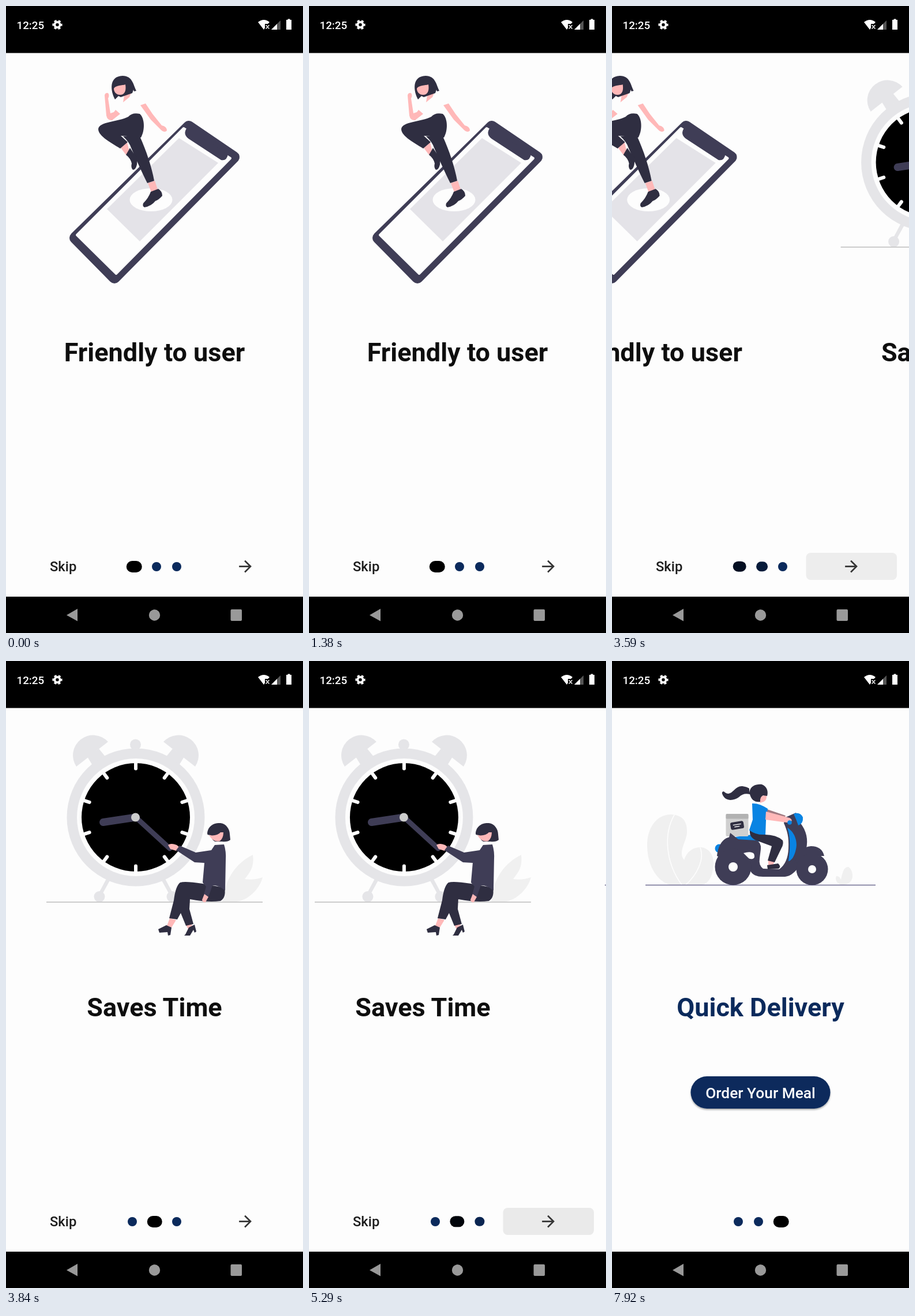
These frames come from a looping animation (515 px wide and 1087 px high, 8000 ms). An HTML page:

```html
<!DOCTYPE html>
<html lang="en">
<head>
<meta charset="utf-8">
<title>Onboarding</title>
<style>
html, body { margin: 0; width: 100%; height: 100%; overflow: hidden; background: #fdfdfd; }
body { position: relative; font-family: Roboto, sans-serif; }
svg { position: absolute; left: 0; top: 0; display: block; }
text { font-weight: 500; }
.title { font-size: 45px; font-weight: 700; text-anchor: middle; fill: #0e0e0e; }
.navy { fill: #0b2a5c; }
.ink { fill: #2f2e41; }
.slate { fill: #3f3d56; }
.skin { fill: #ffb8b8; }
.paper { fill: #fdfdfd; }
.pale { fill: #e5e5e8; }
.leaf { fill: #f0f0f0; }
.blue { fill: #0984e3; }
.line { fill: none; stroke-linecap: round; }

#strip, .dot, #controls, #press { animation: 8s infinite ease-in; }
#strip { animation-name: slide; }
@keyframes slide {
  0%, 42.5% { transform: translateX(0); }
  46.875%, 64.9% { transform: translateX(-515px); }
  69.275%, 100% { transform: translateX(-1030px); }
}

#controls { animation-name: hide; animation-timing-function: step-end; }
@keyframes hide {
  0% { visibility: visible; }
  67.775%, 100% { visibility: hidden; }
}

#press { animation-name: press; animation-timing-function: linear; opacity: 0; }
@keyframes press {
  0%, 41.25% { opacity: 0; }
  43.1%, 44.4% { opacity: 1; }
  47.4%, 63.6% { opacity: 0; }
  65.4%, 66.7% { opacity: 1; }
  69.8%, 100% { opacity: 0; }
}

.dot {
  position: absolute; top: 971.5px; width: 16px; height: 16px;
  border-radius: 10px; background: #0b2a5c; transform: translate(-50%, -50%);
}
#d0 { animation-name: first; }
#d1 { animation-name: second; }
#d2 { animation-name: third; }
@keyframes first {
  0%, 42.5% { left: 222px; width: 26.5px; height: 20px; background: #000; }
  46.875%, 100% { left: 219px; width: 16px; height: 16px; background: #0b2a5c; }
}
@keyframes second {
  0%, 42.5% { left: 261px; width: 16px; height: 16px; background: #0b2a5c; }
  46.875%, 64.9% { left: 257.5px; width: 26.5px; height: 20px; background: #000; }
  69.275%, 100% { left: 254px; width: 16px; height: 16px; background: #0b2a5c; }
}
@keyframes third {
  0%, 64.9% { left: 296px; width: 16px; height: 16px; background: #0b2a5c; }
  69.275%, 100% { left: 293px; width: 26.5px; height: 20px; background: #000; }
}
</style>
</head>
<body>
<svg width="515" height="1087" viewBox="0 0 515 1087">
  <defs>
    <filter id="shadow" x="-10%" y="-20%" width="120%" height="150%">
      <feDropShadow dx="0" dy="2" stdDeviation="1.5" flood-opacity=".35"/>
    </filter>
    <g id="bell">
      <path d="M122 183A35 35 0 0 1 177 140Z"/>
      <path d="M141 166L161 152L174 168L152 184Z"/>
      <path d="M176 374L182 377L166 406L160 404Z"/>
      <circle cx="162" cy="408.5" r="9.5"/>
    </g>
  </defs>

  <g id="strip">
    <!-- phone -->
    <g>
      <path class="slate" d="M317 209L395 262L188 471L120 402Z" stroke="#3f3d56" stroke-width="20" stroke-linejoin="round"/>
      <path class="paper" d="M123 397L308 212L389 264L191 464Z" stroke="#fdfdfd" stroke-width="4" stroke-linejoin="round"/>
      <path class="slate" d="M314 211L385 257Q383 269 373 267L318 231Q307 224 312 214Z"/>
      <path fill="#e4e3e8" d="M300 229L368 272L232 408L175 352Z"/>
      <ellipse class="paper" cx="251.5" cy="336" rx="37" ry="20"/>
      <g class="skin">
        <path d="M171 155Q172 150 177 151Q180 155 177 160L181 186L187 184L190 180L198 187L184 198Q176 199 174 190Z"/>
        <path d="M233 172L242 169L254 187L270 207Q279 209 279 216Q274 221 267 213L251 197Z"/>
        <path d="M203 167L205 155L217 151L214 158Z"/>
        <path d="M199 246L210 236L214 252L208 258Z"/>
        <path d="M246 307L258 303L263 318L252 323Z"/>
      </g>
      <g class="ink">
        <path d="M189 162C181 147 178 122 202 121C220 121 221 138 226 147L222 148L221 145L219 151L199 158L195 156Z"/>
        <path d="M212 192C195 201 160 200 160 214C161 226 182 237 198 247L211 236L199 225L234 228C241 216 241 195 232 187Q219 184 212 192Z"/>
        <path d="M203 226Q214 236 217 246C224 262 234 285 245 307L257 303C253 280 243 250 232 226Z"/>
        <path d="M208 258L215 246Q221 256 228 263L227 275Q225 284 220 284Q216 280 218 273Q216 264 208 258Z"/>
        <path d="M251 322L264 317Q271 321 271 329Q265 336 259 338Q252 347 240 349Q236 347 238 342Q247 333 251 322Z"/>
      </g>
      <path class="skin" d="M187 143C190 137 202 138 207 136C209 148 205 154 198 154C191 154 187 149 187 143Z"/>
      <text class="title" x="257.5" y="616">Friendly to user</text>
    </g>

    <!-- clock -->
    <g transform="translate(515)">
      <path class="leaf" d="M376 417C380 375 400 350 428 336C430 350 427 361 420 370L414 378C425 380 436 378 445 375C440 395 420 415 400 417Z"/>
      <g class="pale">
        <use href="#bell"/>
        <use href="#bell" transform="matrix(-1 0 0 1 450 0)"/>
        <circle cx="224.5" cy="145" r="9.5"/>
        <circle cx="225" cy="271" r="119.5"/>
      </g>
      <circle class="paper" cx="225" cy="271" r="102"/>
      <circle cx="225" cy="271" r="94"/>
      <g id="ticks" stroke="#fdfdfd" stroke-width="6" stroke-linecap="round"></g>
      <path class="line" d="M225 271L168.500 279.500" stroke="#3f3d56" stroke-width="13"/>
      <path class="line" d="M225 271L284 325" stroke="#3f3d56" stroke-width="9"/>
      <circle cx="224.500" cy="271" r="7.500" fill="#ccc"/>
      <path d="M70 418H445" stroke="#ccc" stroke-width="1.800"/>
      <g class="skin">
        <path d="M281 319Q286 315 296 319L301 323L295 329L285 326Z"/>
        <path d="M284 446L295 449L287 462L279 459Z"/>
        <path d="M312 458L322 456L324 464L316 465Z"/>
      </g>
      <g class="ink">
        <path d="M302 384Q310 381 341 386L379 393Q382 410 372 416Q350 419 319 413L318 430L325 456L312 459L303 437L297 448L283 446L291 415Q294 390 302 384Z"/>
        <path d="M264 465L278 458L287 462L285 475L281 476L280 470L266 471Z"/>
        <path d="M311 474L317 462L327 457L330 469L327 471L325 466L319 476L309 476Z"/>
        <path d="M349 299C350 285 362 280 372 281C382 282 388 292 388 300L389 310Q384 314 375 313H353Z"/>
      </g>
      <path class="paper" d="M348 301L355 302Q357 311 364 314H350Z"/>
      <path class="skin" d="M352 302Q366 304 372 297L377 297Q377 307 371 312Q360 315 352 302Z"/>
      <path class="slate" d="M362 319L378 318Q382 330 381 345L380 398Q368 388 358 389L351 409L343 405L347 391L341 384L344 350L327 349L295 328L301 320L329 332L356 328Z"/>
      <path class="skin" d="M344 404L351 409L346 418Q341 419 340 414Z"/>
      <text class="title" x="257.500" y="616">Saves Time</text>
    </g>

    <!-- scooter -->
    <g transform="translate(1030)">
      <path class="leaf" d="M100 388C75 380 60 350 61 315C63 285 80 266 102 266C122 267 131 277 130 298C128 315 118 325 122 340L125 345C130 330 140 323 154 323C168 324 176 336 176 350C176 375 165 388 155 388Z"/>
      <path class="line" d="M108 267C89 300 93 350 121 388M153 324C161 345 146 372 128 388" stroke="#fdfdfd" stroke-width="1.600"/>
      <path class="leaf" d="M397 388C390 386 386 378 389 373Q394 372 397 379C400 365 402 357 410 357C418 362 418 375 416 378C414 385 406 388 401 388Z"/>
      <path d="M58 388.500H457" stroke="#6f6d92" stroke-width="1.500"/>
      <circle class="blue" cx="186" cy="325" r="7.500"/>
      <path class="blue" d="M214 305L242 301L258 307V313H216Z"/>
      <g class="slate">
        <path d="M182 338C185 315 195 306 206 305L204 299L217 309L250 311Q259 314 258 326L256 342Q254 354 262 360L290 361Q305 350 306 325C307 305 304 295 298 281L301 271L319 263L326 280C338 295 340 310 337 325C332 345 320 372 300 374H262Q245 374 240 364Z"/>
        <path d="M316 352Q325 322 345 321Q364 321 368 338H345Z"/>
        <circle cx="210" cy="357" r="31.500"/>
        <circle cx="347" cy="361" r="27.500"/>
      </g>
      <circle class="paper" cx="210" cy="357" r="8"/>
      <circle class="paper" cx="347" cy="361" r="7"/>
      <path class="paper" d="M228 333Q241 329 246 334Q249 341 244 343Q238 344 236 341Z"/>
      <path class="blue" d="M304 289C318 297 322 315 319 326C316 340 311 346 306 347C309 325 310 307 304 289Z"/>
      <path class="blue" d="M315 265Q326 261 331 271Q332 282 323 285Q320 276 315 265Z"/>
      <rect x="197.500" y="266" width="39" height="38" rx="2" fill="#d0d0d0"/>
      <rect x="197.500" y="265" width="39" height="8.500" rx="1.500" fill="#b2b2b2"/>
      <path class="slate" d="M205 298L220 310H202Z"/>
      <g transform="rotate(-9 217 285)">
        <rect class="ink" x="205.500" y="278.500" width="23" height="13" rx="3"/>
        <path d="M210 283.500H224M212 287H221" stroke="#fff" stroke-width="1.400"/>
      </g>
      <path d="M266 256L301 268L298 274L266 267Z" fill="#a27b82"/>
      <path class="blue" d="M243 247Q255 246 270 256L267 276L266 302Q250 305 241 299L238 293L244 275Z"/>
      <path class="skin" d="M267 261L308 272Q314 275 310 280L303 280L266 275Z"/>
      <circle class="blue" cx="308" cy="280" r="3.800"/>
      <path class="skin" d="M271 345L282 347L279 354H271Z"/>
      <path class="ink" d="M239 294Q250 302 265 301Q285 301 296 311Q298 317 294 324L282 349L270 346L277 321L250 311Q238 306 239 294Z"/>
      <path class="ink" d="M269 354L288 351Q294 356 289 360L270 361Z"/>
      <path class="skin" d="M253 236L268 232Q269 241 263 244L257 246Z"/>
      <path class="ink" d="M238 228C240 215 252 213 260 214C270 218 271 228 269 234L262 233Q256 236 257 244Q243 246 239 231Q228 228 220 236C212 242 196 245 191 230C190 226 194 225 196 228C208 236 212 216 226 217Q234 218 238 221Z"/>
      <text class="title navy" style="fill:#0b2a5c" x="257.500" y="616">Quick Delivery</text>
      <rect class="navy" x="136.500" y="720" width="242" height="56" rx="28" filter="url(#shadow)"/>
      <text x="257.500" y="758" text-anchor="middle" font-size="26.300" fill="#fff">Order Your Meal</text>
    </g>
  </g>

  <g id="controls">
    <rect id="press" x="336.500" y="948" width="157.500" height="47" rx="8" fill="#eaeaea"/>
    <text x="76" y="980" font-size="23.800" fill="#1c1c1c">Skip</text>
    <path transform="translate(398.700 955.300) scale(1.360)" fill="#363636" d="M12 4l-1.410 1.410L16.170 11H4v2h12.170l-5.580 5.590L12 20l8-8z"/>
  </g>

  <!-- system bars -->
  <rect width="515" height="81.500"/>
  <rect y="1024" width="515" height="63"/>
  <g fill="#fff">
    <text x="18.500" y="39.700" font-size="18.800">12:25</text>
    <path d="M437 28Q447 20 457 28L454 31H449V38L447 41Z"/>
    <path d="M476 25V41H460Z" fill="#555"/>
    <path d="M470 31V41H460Z"/>
    <path d="M488.500 24V22.500H492.500V24H495V41H486V24Z"/>
  </g>
  <path class="line" d="M451 33.500L456 39M456 33.500L451 39" stroke="#fff" stroke-width="1.500"/>
  <g fill="none" stroke="#fff">
    <circle cx="89" cy="32.500" r="4.600" stroke-width="3.800"/>
    <circle cx="89" cy="32.500" r="7" stroke-width="3.200" stroke-dasharray="4 3.330" stroke-dashoffset="2"/>
  </g>
  <g fill="#999">
    <path d="M124 1045V1066.500L105 1056Z"/>
    <circle cx="257.500" cy="1056" r="9.700"/>
    <rect x="389.500" y="1046" width="19.500" height="20" rx="2"/>
  </g>
</svg>
<div class="dot" id="d0"></div>
<div class="dot" id="d1"></div>
<div class="dot" id="d2"></div>
<script>
document.getElementById('ticks').innerHTML = Array.from({ length: 10 }, (_, i) =>
  `<path d="M225 176V186.5" transform="rotate(${i * 36} 225 271)"/>`).join('');
</script>
</body>
</html>
```
